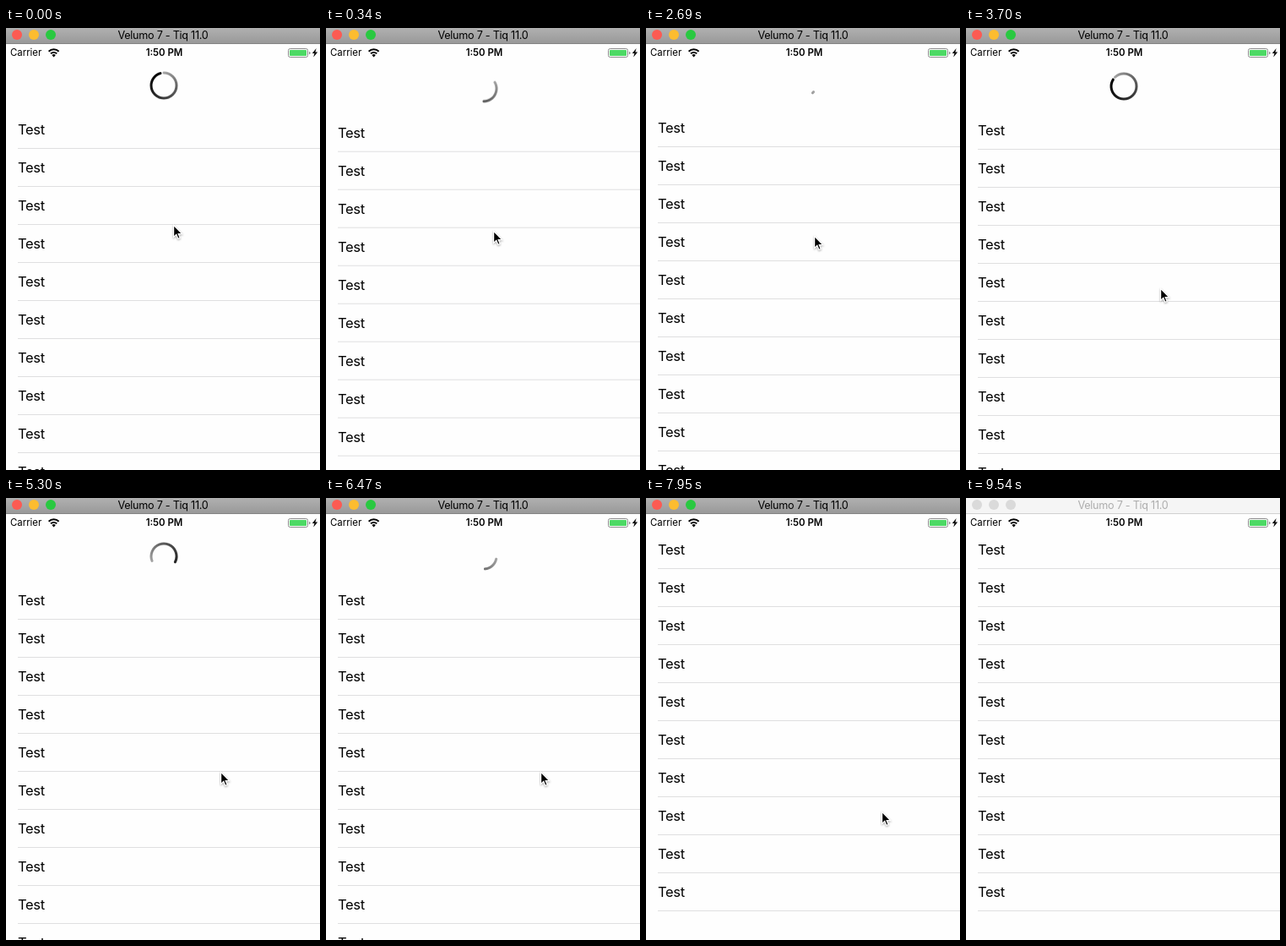
An HTML page with a canvas for the animation above (9570 ms loop, 372 by 523 pixels).

```html
<!DOCTYPE html>
<html lang="en">
<head>
<meta charset="utf-8">
<title>Pull to refresh</title>
<style>
  html, body { margin: 0; width: 100%; height: 100%; overflow: hidden; }
  body {
    position: relative;
    background: #fefefe;
    color: #000;
    font-family: Inter, Roboto, sans-serif;
  }
  .bar, .status, .view, .cursor, .ring, .status > * { position: absolute; }

  /* window title bar */
  .bar {
    inset: 0 0 auto;
    height: 18px;
    border-bottom: 1px solid #848484;
    background: linear-gradient(#b0b0b0, #999);
    font: 12.6px/17px Inter, sans-serif;
    letter-spacing: -.02em;
    text-align: center;
    animation: blur 9570ms step-end infinite;
  }
  .bar i {
    position: absolute;
    top: 2px;
    width: 12px;
    height: 12px;
    border-radius: 50%;
    background: var(--c);
    animation: dim 9570ms step-end infinite;
  }
  @keyframes blur {
    99.687%, 100% { background: #f5f5f5; border-color: #d0d0d0; color: #adadad; }
  }
  @keyframes dim { 99.687%, 100% { background: #dadada; } }

  /* phone status bar */
  .status { inset: 19px 0 auto; height: 20px; line-height: 20px; font-size: 11.4px; }
  .status b { left: 0; width: 375px; text-align: center; font-weight: 600; }
  .status svg { left: 0; top: 0; }

  /* list */
  .view { inset: 39px 0 0; overflow: hidden; }
  .list { position: relative; animation: pull 9570ms linear infinite; }
  .row {
    height: 44px;
    margin-left: 14px;
    border-bottom: 1px solid #dfdfe0;
    font-size: 16.5px;
    line-height: 44px;
    letter-spacing: -.02em;
  }
  .ring { left: 169.5px; top: -47.3px; width: 34px; height: 34px; }
  @keyframes pull {
    0% { transform: translateY(59px); animation-timing-function: ease-out; }
    9.4%, 25.08% { transform: translateY(65.8px); animation-timing-function: ease-in-out; }
    28.11% { transform: translateY(57px); animation-timing-function: ease-in-out; }
    30.3%, 72.675% { transform: translateY(60px); animation-timing-function: ease-in-out; }
    76.33%, 100% { transform: translateY(0); }
  }

  /* pointer */
  .cursor {
    overflow: visible;
    animation: moveX 9570ms linear infinite, moveY 9570ms linear infinite;
  }
  @keyframes moveX {
    0% { left: 198px; }
    9.4%, 34.48% { left: 199px; animation-timing-function: cubic-bezier(.4, 0, .5, 1); }
    42.84%, 79.94% { left: 254px; animation-timing-function: ease-in-out; }
    87.46%, 100% { left: 322px; }
  }
  @keyframes moveY {
    0% { top: 233px; animation-timing-function: ease-out; }
    9.4%, 34.48% { top: 245.5px; animation-timing-function: cubic-bezier(.35, .3, .3, 1); }
    42.84%, 79.94% { top: 323.5px; animation-timing-function: ease-in; }
    87.46%, 100% { top: 530px; }
  }
</style>
</head>
<body>
<div class="view">
  <div class="list"><canvas class="ring" width="68" height="68"></canvas></div>
</div>

<div class="status">
  <span style="left:5px">Carrier</span>
  <b>1:50 PM</b>
  <svg width="372" height="20">
    <g fill="none" stroke="#000" stroke-width="2">
      <path d="M50.6 8.7a8.6 8.6 0 0 1 12 0M53 11.3a5.3 5.3 0 0 1 7.2 0"/>
    </g>
    <path d="M56.6 15.4l-2.2-2.3a3.2 3.2 0 0 1 4.4 0z"/>
    <rect x="334.5" y="5.5" width="23" height="10" rx="2" fill="none" stroke="#8b8b8b"/>
    <rect x="336" y="7" width="20" height="7" rx=".8" fill="#4cd964"/>
    <path d="M359 8.7q1.6.4 1.6 1.8t-1.6 1.8z" fill="#8b8b8b"/>
    <path d="M367.6 5l-4.8 6h2.7l-1.3 4.5 5-6.1h-2.8z"/>
  </svg>
</div>

<div class="bar">
  <i style="left:7px;--c:#fc5b53"></i>
  <i style="left:27px;--c:#fdbc2e"></i>
  <i style="left:47px;--c:#29c940"></i>
  Velumo 7 - Tiq 11.0
</div>

<svg class="cursor" width="12" height="18">
  <path d="M.6.4v14l3.2-3 2.1 5 2.3-1-2-4.8h4.4z" stroke="#fff" stroke-width="1.2"
    style="filter:drop-shadow(0 1px 1px #0005)"/>
</svg>

<script>
  const list = document.querySelector('.list');
  const view = document.querySelector('.view');
  const ctx = document.querySelector('.ring').getContext('2d');
  const LOOP = 9570, REFRESH_FROM = 60, REFRESH_TO = 6955;
  const THRESHOLD = 60, SWEEP = 1000, TROUGH = 650;
  const rad = deg => deg * Math.PI / 180;

  for (let i = 0; i < 10; i++) {
    const row = document.createElement('div');
    row.className = 'row';
    row.textContent = 'Test';
    list.append(row);
  }

  const shade = ctx.createConicGradient(rad(-10), 0, 0);
  [[0, '#aaa'], [.28, '#666'], [.56, '#333'], [.93, '#000'], [1, '#000']]
    .forEach(([at, color]) => shade.addColorStop(at, color));

  function drawRing(start, length) {
    ctx.setTransform(2, 0, 0, 2, 34, 34);
    ctx.clearRect(-17, -17, 34, 34);
    if (length <= 0) return;
    ctx.rotate(rad(start - 90));
    ctx.lineWidth = 3;
    ctx.lineCap = 'round';
    ctx.strokeStyle = shade;
    ctx.beginPath();
    ctx.arc(0, 0, 15, 0, rad(length));
    ctx.stroke();
  }

  const clock = list.getAnimations()[0];

  function tick() {
    const t = (clock.currentTime || 0) % LOOP;
    if (t >= REFRESH_FROM && t < REFRESH_TO) {
      // the arc opens and closes while it turns
      const phase = Math.abs(t - TROUGH) / SWEEP % 2;
      drawRing(.183 * t + 2, 360 * (1 - Math.abs(1 - phase)));
    } else {
      const offset = list.getBoundingClientRect().top - view.getBoundingClientRect().top;
      drawRing(0, 350 * Math.min(offset / THRESHOLD, 1));
    }
    requestAnimationFrame(tick);
  }
  tick();
</script>
</body>
</html>
```
